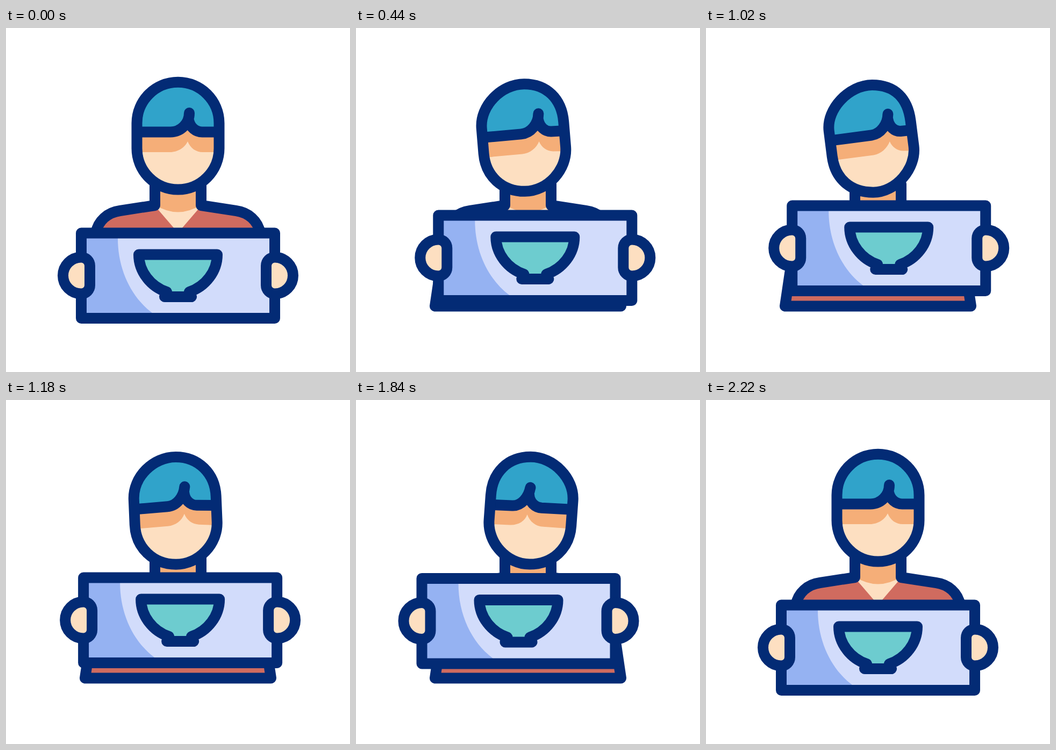
Animation, 640 px wide and 640 px high, one loop 2.4 s. Source, as an HTML page:

```html
<!DOCTYPE html>
<html lang="en">
<head>
<meta charset="utf-8">
<title>Person with bowl sign</title>
<style>
html, body { margin: 0; height: 100%; overflow: hidden; background: #fff; }
svg { display: block; width: 100%; height: 100%; }
.line { stroke: #032b75; stroke-width: 20; stroke-linecap: round; stroke-linejoin: round; }
.none { fill: none; }
.skin { fill: #fddfc1; }
.shade { fill: #f5ae78; }
</style>
</head>
<body>
<svg viewBox="0 0 640 640">
  <defs>
    <clipPath id="clip"><path class="head"/></clipPath>
    <path id="torso" d="M277 290V330L212 340C190 343 171 358 167 382L147 517.5H493L473 382C469 358 450 343 428 340L363 330V290"/>
    <path id="hand" d="M140 426.5A34 34 0 0 0 140 494.5A16 16 0 0 0 156 478.5V442.5A16 16 0 0 0 140 426.5Z"/>
  </defs>

  <use href="#torso" fill="#d06b5f"/>
  <path class="skin" d="M277 290V331L320 381L363 331V290Z"/>
  <path class="shade" d="M277 280V329Q320 356 363 329V280Z"/>
  <use href="#torso" class="line none"/>

  <path class="head skin"/>
  <g clip-path="url(#clip)">
    <path id="shadow" class="shade"/>
    <path id="hair" fill="#30a3ca"/>
  </g>
  <path id="fringe" class="line none"/>
  <path class="head line none"/>

  <g id="board">
    <path fill="#d2dcfb" d="M140 381.5H500V540H140Z"/>
    <path fill="#95b2f2" d="M140 385H208V391C208 448 232 500 272 530V536H140Z"/>
    <path class="line none" d="M140 381.5H500V540H140Z"/>
    <path class="line" fill="#6dcccf" d="M247 421.5H393C393 453 371 481 341 491L345 500H295L299 491C269 481 247 453 247 421.5Z"/>
    <use href="#hand" class="line skin"/>
    <use href="#hand" class="line skin" transform="matrix(-1 0 0 1 640 0)"/>
  </g>
</svg>
<script>
// Rest, lean left, lean right. Head: centre x, y, tilt in degrees, crown x, chin x.
const poses = [
  {
    board: '0 0',
    head: '320 200.5 0 320 320',
    left: '244 193.5L306 193.5C325.5 193.5 341 177.5 341 158',
    right: '340 172C343 185 353 193.5 365 193.5L396 193.5',
    shadow: '240 231L305 231C320 231 333 222 338 211C343 224 354 231 366 231L400 231'
  },
  {
    board: '20.5 -51',
    head: '307.5 205.7 -7.3 309 311',
    left: '236 209L308 199.5C325 197 338.5 179 338.5 160',
    right: '338.5 170C341 184 351 192.5 362 192L380 190',
    shadow: '232 247L312 236.5C326 234 337 224 342 211C346 221 356 228.5 367 228.5L390 228'
  },
  {
    board: '-18 -51',
    head: '325.7 205.7 4.2 325 323',
    left: '256 195L290 196.5C307 197.5 320.5 181 324 163',
    right: '321.5 176C322 190 332 200 345 201L402 204',
    shadow: '245 230.5L286 232.5C302 233 314 225 318 213C323 227 334 235 348 236L405 240'
  }
];

const number = /-?\d+(\.\d+)?/g;
const $ = id => document.getElementById(id);
const heads = document.querySelectorAll('.head');

// Blend two strings of the same form, number by number.
function mix(a, b, p) {
  const to = b.match(number);
  let i = 0;
  return a.replace(number, n => (+n + (to[i++] - n) * p).toFixed(3));
}

// Capsule with tilted sides and a level crown and chin.
function headPath(cx, cy, tilt, crown, chin) {
  const s = Math.sin(tilt * Math.PI / 180), c = Math.cos(tilt * Math.PI / 180);
  const at = (x, y) => `${cx + x * c - y * s} ${cy + x * s + y * c} `;
  const w = 76.5, h = 23.5, k = 42.2, top = cy - 99.7, base = cy + 100;
  return `M${at(-w, -h)}C${at(-w, -h - k)}${crown - k} ${top} ${crown} ${top} ` +
    `C${crown + k} ${top} ${at(w, -h - k)}${at(w, -h)}L${at(w, h)}` +
    `C${at(w, h + k)}${chin + k} ${base} ${chin} ${base} ` +
    `C${chin - k} ${base} ${at(-w, h + k)}${at(-w, h)}Z`;
}

function draw(now) {
  const t = Math.floor(now / 20) * 20 % 2400;
  const u = (t + 2200) % 2400;
  const i = Math.floor(u / 800);
  const s = Math.min(1, u % 800 / 400);
  const p = s * s * (3 - 2 * s);
  const part = key => mix(poses[i][key], poses[(i + 1) % 3][key], p);

  const left = part('left'), right = part('right');
  const outline = headPath(...part('head').split(' ').map(Number));
  heads.forEach(el => el.setAttribute('d', outline));
  $('fringe').setAttribute('d', `M${left}M${right}`);
  $('hair').setAttribute('d', `M${left}L${right}L420 80L220 80Z`);
  $('shadow').setAttribute('d', `M${part('shadow')}L420 80L220 80Z`);
  $('board').setAttribute('transform', `translate(${part('board')})`);
}

function loop() {
  draw(performance.now());
  requestAnimationFrame(loop);
}
loop();
</script>
</body>
</html>
```
